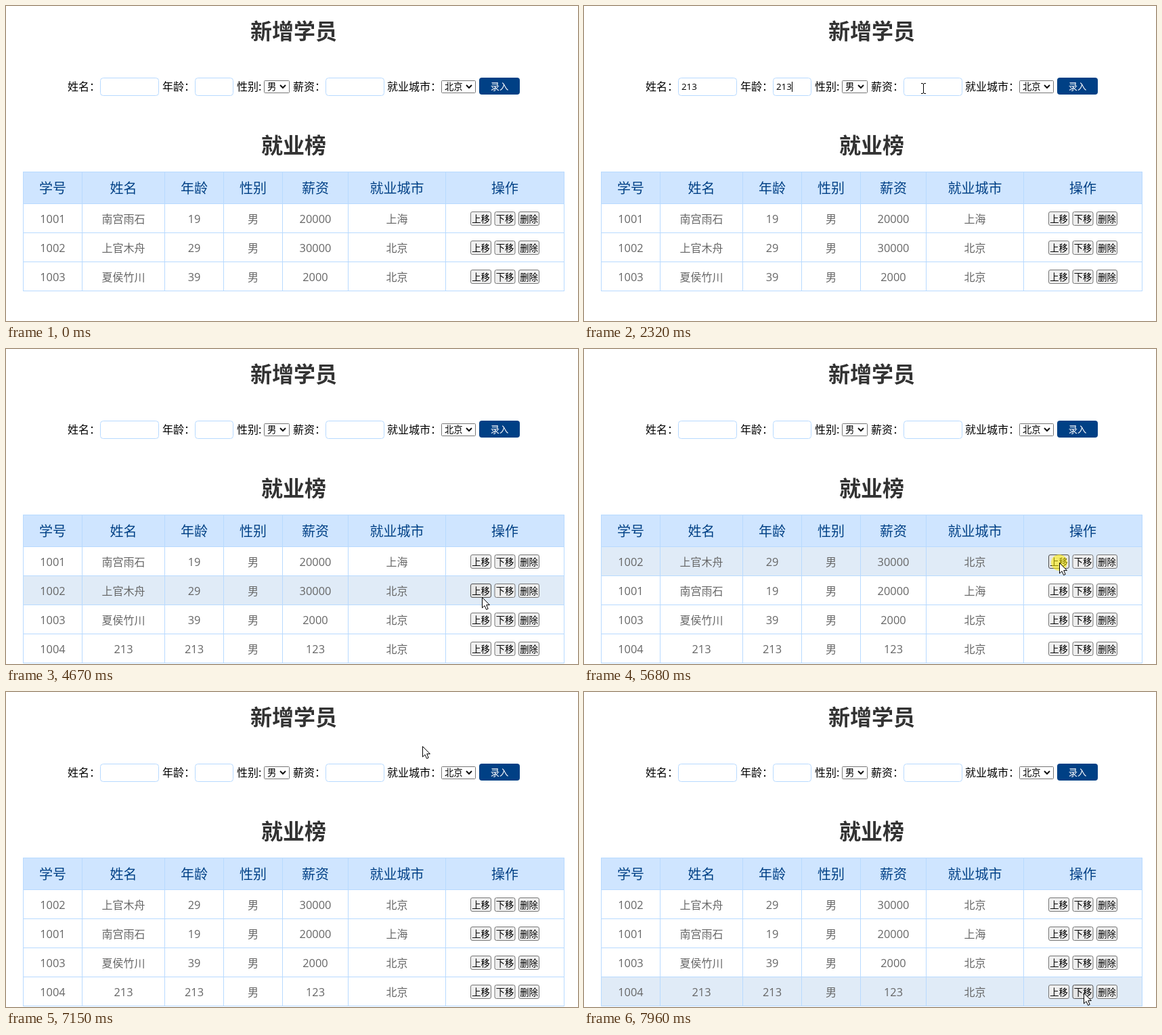
An HTML page for the animation above (8 s loop, 845 by 466 pixels).

```html
<!DOCTYPE html>
<html lang="zh-CN">
<head>
<meta charset="utf-8">
<title>就业榜</title>
<style>
  html, body { margin: 0; width: 100%; height: 100%; overflow: hidden; background: #fff; }
  svg { display: block; width: 845px; height: 466px; font: 16px "Noto Sans CJK SC", "Noto Sans CJK", sans-serif; }
  text { white-space: pre; }
  .mid { text-anchor: middle; }
  .title { font-size: 32px; font-weight: 700; fill: #333; }
  .head { font-size: 20px; fill: #004085; }
  .cell { fill: #666; }
  .num { font-family: "Open Sans", "Noto Sans", sans-serif; font-size: 16.4px; }
  .small { font-size: 13.33px; }
  .typed { font-family: "Open Sans", "Noto Sans", sans-serif; font-size: 13.33px; }
  .grid { fill: none; stroke: #b8daff; }
  .input { fill: #fff; stroke: #b8daff; }
  .select { fill: #fff; stroke: #767676; }
  .btn { fill: #efefef; stroke: #767676; }
  .btn.over { fill: #e5e5e5; stroke: #4f4f4f; }
  .chevron { fill: none; stroke: #111; stroke-width: 2; }
  .pointer path { fill: #fff; stroke: #000; stroke-linejoin: round; }
</style>
</head>
<body>
<svg id="stage" viewBox="0 0 845 466"></svg>
<script>
const LOOP = 8000;
const stage = document.getElementById('stage');

function add(parent, tag, attrs, text) {
  const el = document.createElementNS('http://www.w3.org/2000/svg', tag);
  for (const key in attrs) el.setAttribute(key, attrs[key]);
  if (text) el.textContent = text;
  return parent.appendChild(el);
}
const label = (parent, cls, x, y, text) => add(parent, 'text', { class: cls, x, y }, text);
const box = (parent, cls, x, y, width, height, rx = 0) =>
  add(parent, 'rect', { class: cls, x: x + .5, y: y + .5, width, height, rx });
const show = (el, on) => el.setAttribute('visibility', on ? 'visible' : 'hidden');

// Form
label(stage, 'title mid', 425, 49, '新增学员');
label(stage, 'title mid', 425, 218, '就业榜');
[[91, '姓名：'], [231, '年龄：'], [341, '性别:'], [424, '薪资：'], [563, '就业城市：']]
  .forEach(([x, text]) => label(stage, '', x, 124.5, text));

const fields = [
  { x: 139, w: 86, text: '213', focus: 970, keys: [1240, 1310, 1370] },
  { x: 279, w: 56, text: '213', focus: 1570, keys: [1700, 1770, 1830] },
  { x: 472, w: 86, text: '123', focus: 2390, keys: [2520, 2590, 2650] }
];
for (const field of fields) {
  box(stage, 'input', field.x, 106, field.w, 26, 4);
  field.el = label(stage, 'typed', field.x + 5, 124, '');
}
const caret = add(stage, 'path', { d: 'M.5 112V127', stroke: '#000' });

for (const [x, w, text] of [[381, 37, '男'], [643, 50, '北京']]) {
  box(stage, 'select', x, 110, w, 18, 1);
  label(stage, 'small', x + 5, 124, text);
  add(stage, 'path', { class: 'chevron', d: `M${x + w - 13} 117l4 4l4-4` });
}
add(stage, 'rect', { x: 699, y: 106, width: 60, height: 25, rx: 4, fill: '#004085' });
add(stage, 'text', { class: 'small mid', x: 729, y: 124, fill: '#fff' }, '录入');

// Table
const edges = [25, 112, 234, 321, 408, 505, 649, 824];
const columns = edges.slice(0, -1).map((x, i) => ({ x, w: edges[i + 1] - x, mid: (x + edges[i + 1] + 1) / 2 }));
const TOP = 292, ROW = 43;
const BUTTONS = [686, 721.5, 757];

add(stage, 'rect', { x: 25, y: 245, width: 800, height: 48, fill: '#cfe5ff' });
['学号', '姓名', '年龄', '性别', '薪资', '就业城市', '操作'].forEach((text, i) => {
  const { x, w, mid } = columns[i];
  box(stage, 'grid', x, 245, w, 47);
  label(stage, 'head mid', mid, 277, text);
});

const rows = [
  ['1001', '南宫雨石', '19', '男', '20000', '上海'],
  ['1002', '上官木舟', '29', '男', '30000', '北京'],
  ['1003', '夏侯竹川', '39', '男', '2000', '北京'],
  ['1004', '213', '213', '男', '123', '北京']
].map(cells => {
  const g = add(stage, 'g', {});
  const back = add(g, 'rect', { x: 25, y: 0, width: 800, height: ROW });
  columns.forEach(({ x, w, mid }, i) => {
    box(g, 'grid', x, 0, w, ROW);
    const cls = /\d/.test(cells[i]) ? 'cell mid num' : 'cell mid';
    if (cells[i]) label(g, cls, mid, 29, cells[i]);
  });
  const buttons = ['上移', '下移', '删除'].map((text, i) => {
    const el = box(g, 'btn', BUTTONS[i], 12, 30, 20, 2.5);
    label(g, 'small mid', BUTTONS[i] + 15.5, 27.5, text);
    return el;
  });
  return { g, back, buttons };
});

// Pointer
const glow = add(stage, 'circle', { r: 12, fill: '#ffee00', opacity: .55 });
const pointer = add(stage, 'g', { class: 'pointer' });
const shapes = {
  arrow: add(pointer, 'path', { d: 'M.5 .5V16L4 12.7L6.6 18.5L9.2 17.3L6.7 11.6H11.4Z' }),
  beam: add(pointer, 'path', { d: 'M-3-7.5H-1L.5-6.5L2-7.5H4M.5-6.5V6.5M-3 7.5H-1L.5 6.5L2 7.5H4', style: 'fill:none' }),
  hand: add(pointer, 'path', {
    d: 'M-2 13V1.5a1.8 1.8 0 0 1 3.6 0V8a1.8 1.8 0 0 1 3.4 .6a1.8 1.8 0 0 1 3.3 .8a1.5 1.5 0 0 1 2.7 1.2V16' +
       'c0 3-2 4-2 7.5H0C0 20-3 18-6.5 13.5c-1.5-2.3 1.5-4 4.5-.5Z'
  })
};

// time, x, y
const path = [
  [200, 518, 402], [400, 420, 285], [520, 368, 222], [650, 360, 145], [820, 203, 126],
  [1370, 203, 126], [1520, 310, 124], [1850, 310, 124], [2040, 441, 135],
  [2320, 501, 122], [2680, 501, 122], [2860, 689, 124], [2930, 724, 121],
  [3970, 724, 121], [4300, 712, 395], [4470, 708, 390], [4670, 703, 367],
  [5100, 703, 367], [5480, 702, 316], [5900, 702, 316], [6400, 600, 92],
  [6900, 600, 92], [7150, 615, 80], [7210, 615, 80], [7280, 690, 237],
  [7350, 705, 285], [7650, 728, 405], [7900, 738, 445], [8000, 738, 445]
];
const clicks = [[970, 1240], [1570, 1700], [2390, 2520], [3210, 3470], [4800, 5000], [5680, 5850], [6650, 6800]];
const ADDED = 3340, SWAPPED = 4950;

function pointerAt(t) {
  const i = path.findIndex(p => p[0] > t);
  const [t0, x0, y0] = path[i - 1], [t1, x1, y1] = path[i];
  const k = (t - t0) / (t1 - t0);
  return [Math.round(x0 + (x1 - x0) * k), Math.round(y0 + (y1 - y0) * k)];
}

function shapeAt(x, y) {
  if (y < 106 || y > 132) return 'arrow';
  if (x >= 699 && x < 759) return 'hand';
  return fields.some(f => x >= f.x && x <= f.x + f.w) ? 'beam' : 'arrow';
}

function drawFields(t) {
  let active = null;
  for (const field of fields) {
    const count = t < ADDED ? field.keys.filter(k => t >= k).length : 0;
    field.el.textContent = field.text.slice(0, count);
    if (t >= field.focus && t < 3210) active = { field, count };
  }
  show(caret, false);
  if (!active) return;
  const { field, count } = active;
  const since = t - (count ? field.keys[count - 1] : field.focus);
  show(caret, since % 1000 < 500);
  caret.setAttribute('transform', `translate(${Math.round(field.x + 5 + count * 7.63)})`);
}

function drawRows(t, x, y) {
  // The page keeps its last hover while it is blocked.
  const blocked = t >= 5850 && t < 6800;
  const hover = blocked ? 0 : Math.floor((y - TOP) / ROW);
  const order = t < SWAPPED ? [0, 1, 2, 3] : [1, 0, 2, 3];
  order.forEach((id, slot) => {
    const { g, back, buttons } = rows[id];
    const top = TOP + slot * ROW;
    g.setAttribute('transform', `translate(0 ${top})`);
    back.setAttribute('fill', slot === hover ? '#e0ebf7' : '#fff');
    show(g, id < 3 || t >= ADDED);
    buttons.forEach((el, i) => {
      const over = x >= BUTTONS[i] && x < BUTTONS[i] + 31 && y >= top + 12 && y < top + 33;
      el.classList.toggle('over', over);
    });
  });
}

function draw(t) {
  const visible = t >= 200;
  const [x, y] = visible ? pointerAt(t) : [-50, -50];
  const shape = shapeAt(x, y);
  for (const name in shapes) show(shapes[name], visible && name === shape);
  pointer.setAttribute('transform', `translate(${x} ${y})`);
  glow.setAttribute('transform', `translate(${x} ${y})`);
  show(glow, clicks.some(([from, to]) => t >= from && t < to));
  drawFields(t);
  drawRows(t, x, y);
}

const start = performance.now();
function tick() {
  draw((performance.now() - start) % LOOP);
  requestAnimationFrame(tick);
}
tick();
</script>
</body>
</html>
```
